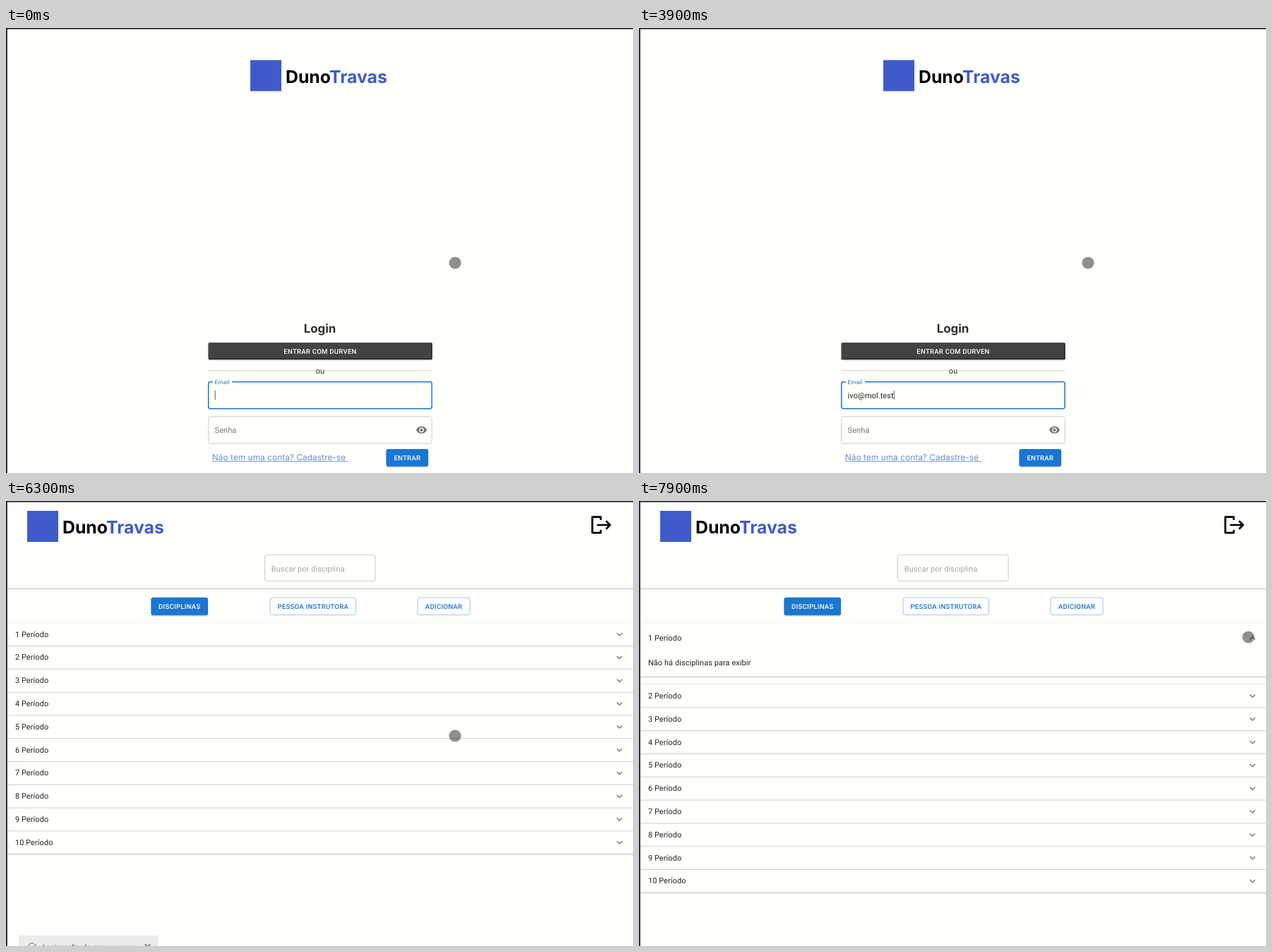
An HTML page that plays this animation: 888x631 px, repeating every 8 s.

```html
<!DOCTYPE html>
<html lang="pt">
<head>
<meta charset="utf-8">
<style>
  html, body { margin: 0; width: 100%; height: 100%; overflow: hidden; background: #fffffc; }
  svg { display: block; text-rendering: geometricPrecision; font: 10.93px Roboto, sans-serif; letter-spacing: .1px; }
  .btn { font-size: 9.56px; font-weight: 500; letter-spacing: .27px; text-anchor: middle; }
  .geo { font-family: Inter, sans-serif; letter-spacing: 0; }
</style>
</head>
<body>
<svg id="stage" width="888" height="631" viewBox="0 0 888 631"></svg>
<script>
const LOOP = 8000, TICK = 100;
const BG = '#fffffc', BLUE = '#1976d2', BRAND = '#3f5bc9', GREY = '#757573', INK = '#20201f';
const EMAIL = 'ivo@mol.test';
const EMAIL_KEYS = [700, 700, 700, 1600, 2300, 2500, 2600, 2800, 3500, 3600, 3700, 3900];
const SECRET_KEYS = [4700, 4800, 4900];
const CARET_OFF = [[400, 700], [1200, 1600], [2200, 2300], [5400, 5800]];
const POINTER = [[0, 636, 333], [6700, 636, 333], [6800, 680, 306], [6900, 766, 254], [7000, 812, 226],
  [7100, 812, 226], [7200, 852, 199], [7300, 860, 194], [7400, 863, 193], [LOOP, 863, 193]];

const clamp = x => Math.min(1, Math.max(0, x));
const ease = x => (x = clamp(x), x * x * (3 - 2 * x));
const typed = (keys, t) => keys.filter(k => t >= k).length;
const pen = document.createElement('canvas').getContext('2d');
pen.font = '10.93px Roboto, sans-serif';
const textWidth = s => pen.measureText(s).width + s.length * .1;

const text = (x, y, s, fill = INK, attrs = '') => `<text x="${x}" y="${y}" fill="${fill}" ${attrs}>${s}</text>`;
const rect = (x, y, w, h, fill, attrs = '') => `<rect x="${x}" y="${y}" width="${w}" height="${h}" fill="${fill}" ${attrs}/>`;
const line = (d, color, width, attrs = '') => `<path d="${d}" fill="none" stroke="${color}" stroke-width="${width}" ${attrs}/>`;
const rule = (x, y, w, color, h = 1) => rect(x, y, w, h, color);

function logo(x, y) {
  return rect(x, y, 44, 44, BRAND) +
    text(x + 50, y + 32, `Duno<tspan fill="${BRAND}">Travas</tspan>`, '#000', 'class="geo" font-size="24.8" font-weight="700"');
}

function button(x, y, w, h, label, fill, outlined) {
  const box = outlined
    ? rect(x + .5, y + .5, w - 1, h - 1, 'none', 'rx="2.7" stroke="#a5c6ea"')
    : rect(x, y + 1.6, w, h, '#0003', 'rx="3"') + rect(x - .5, y + .5, w + 1, h + .3, '#0002', 'rx="3"') +
      rect(x, y, w, h, fill, 'rx="2.7"');
  return box + text(x + w / 2, y + h / 2 + 3.5, label, outlined ? BLUE : '#fff', 'class="btn"');
}

// Outlined input; `lift` moves the label from inside the box onto its border.
function field(y, label, notch, value, lift, focus, caret) {
  const color = focus ? BLUE : '#cbcbc8', w = focus ? 1.5 : 1;
  const labelY = y + 22.5 - 19.7 * lift;
  return rect(286.7, y, 316.4, 38, 'none', `rx="2.7" stroke="${color}" stroke-width="${w}"`) +
    rect(293, y - 1.5, notch * lift, 3, BG) +
    text(295.6, labelY, label, focus ? BLUE : GREY, `font-size="${10.93 - 2.73 * lift}"`) +
    text(295.6, y + 22.8, value) +
    (caret ? rect(295.7 + textWidth(value), y + 12.3, .9, 13, '#444') : '');
}

function login(t) {
  const onSecret = t >= 4000, lift = ease((t - 3950) / 220);
  const caret = !CARET_OFF.some(([a, b]) => t >= a && t < b);
  return logo(346, 45.5) +
    text(444.5, 432.3, 'Login', '#2d2d2c', 'class="geo" font-size="16.9" font-weight="700" text-anchor="middle"') +
    button(286.5, 446, 317, 24, 'ENTRAR COM DURVEN', '#424242') +
    line('M287 469.3H602.8V446.5', '#222', 1.3) + line('M287.2 469V446.6H602', '#5a5a5a', .9) +
    rule(286.5, 485.3, 152.5, '#cfcfcc') + rule(451.5, 485.3, 152, '#cfcfcc') +
    text(445, 490, 'ou', INK, 'class="geo" font-size="10.4" text-anchor="middle"') +
    field(501.8, 'Email', 27, EMAIL.slice(0, typed(EMAIL_KEYS, t)), 1, !onSecret, caret && !onSecret) +
    field(551, 'Senha', 30, '•'.repeat(typed(SECRET_KEYS, t)), lift, onSecret, caret && onSecret) +
    `<path transform="translate(580.3 561.8) scale(.683)" fill="${GREY}" d="M12 4.5C7 4.5 2.73 7.61 1 12c1.73 4.39 6 7.5 11 7.5s9.27-3.11 11-7.5c-1.73-4.39-6-7.5-11-7.5zM12 17c-2.76 0-5-2.24-5-5s2.24-5 5-5 5 2.24 5 5-2.24 5-5 5zm0-8c-1.66 0-3 1.34-3 3s1.34 3 3 3 3-1.34 3-3-1.34-3-3-3z"/>` +
    text(291.8, 612.7, 'Não tem uma conta? Cadastre-se', '#6b8dcb', 'class="geo" font-size="11.95"') +
    rule(292, 614, 192, '#6b8dcb', .9) +
    button(538.5, 597, 59.5, 24.5, 'ENTRAR', BLUE);
}

function chevron(y, turn = 0) {
  return line('M-3.7-1.9L0 1.8L3.7-1.9', GREY, 1.35, `transform="translate(868.9 ${y}) rotate(${turn})"`);
}

function periods(t) {
  const ROW = 32.8, TOP = 172.5;
  const p = ease((t - 7540) / 300), head = p ** .8, body = 32.8 * p ** 1.2;
  const headH = ROW + 10.9 * head, bottom = TOP + headH + body;
  const next = bottom + 10.9 * head;
  let out = rule(2, TOP - .7, 886, '#f3f3f0');
  out += text(12.9, TOP + headH / 2 + 3.7, '1 Período') + chevron(TOP + headH / 2 + .2, 180 * head);
  if (p > 0) {
    out += `<svg x="0" y="${TOP}" width="888" height="${bottom - TOP}">` +
      text(12.9, headH + 17.2, 'Não há disciplinas para exibir') + '</svg>' +
      rule(2, bottom - .2, 886, '#bdbdba') + rule(2, bottom + .8, 886, '#e9e9e6') +
      rule(2, next - .5, 886, '#e3e3e0');
  } else out += rule(2, next - .3, 886, '#cfcfcc');
  for (let i = 0; i < 9; i++) {
    const y = next + ROW * i;
    out += text(12.9, y + 20.1, `${i + 2} Período`) + chevron(y + 16.6);
    if (i) out += rule(2, y - .3, 886, '#cfcfcc');
  }
  const end = next + ROW * 9;
  return out + rule(2, end - .3, 886, '#bdbdba') + rule(2, end + .7, 886, '#e6e6e3');
}

function toast(t) {
  const enter = clamp((t - 5760) / 250), leave = clamp((t - 7500) / 290);
  if (leave === 1) return '';
  const s = .75 + .25 * enter, w = leave ? 71 : 198;
  const cross = 18 + w - 15.5;
  return `<g opacity="${enter ** 2 * (1 - leave)}" transform="translate(117 632.5) scale(${s} ${s * s}) translate(-117 -632.5)">` +
    rect(18, 616, w, 33, '#ebebe9', 'rx="2"') +
    line('M42 631A5.3 5.3 0 1 1 39.5 627.6M34.5 631.5L37 634L43 628', leave ? '#b98a7c' : '#858583', 1.2) +
    (leave ? '' : text(52, 635.6, 'Login realizado com sucesso', INK, 'font-size="9.8"')) +
    line(`M${cross - 3.8} 628.4l7.6 7.6m0-7.6l-7.6 7.6`, '#444', 1.2) + '</g>';
}

function home(t) {
  return logo(30, 14) +
    line('M842.3 27V22.6H830.4V45.2H842.3V41M837 34H855.5M849.8 28.3L855.5 34L849.8 39.7', '#000', 2.7, 'stroke-linejoin="round"') +
    rect(366.5, 76.3, 156.6, 37.3, 'none', 'rx="2.7" stroke="#cbcbc8"') +
    text(375.8, 99.5, 'Buscar por disciplina', '#a3a3a1') +
    rule(2, 124, 886, '#bcbcb9') +
    button(205.5, 136.7, 80.5, 25, 'DISCIPLINAS', BLUE) +
    button(373.5, 136.5, 122.5, 25.5, 'PESSOA INSTRUTORA', BLUE, true) +
    button(582.5, 136.5, 75, 25.5, 'ADICIONAR', BLUE, true) +
    (t >= 6000 ? periods(t) : '') + toast(t);
}

function pointer(t) {
  const i = POINTER.findIndex(k => k[0] > t), [t0, x0, y0] = POINTER[i - 1], [t1, x1, y1] = POINTER[i];
  const f = (t - t0) / (t1 - t0), pressed = t >= 1300 && t < 1800;
  return `<circle cx="${x0 + (x1 - x0) * f}" cy="${y0 + (y1 - y0) * f}" r="8.6" fill="#000" fill-opacity="${pressed ? .52 : .44}"/>`;
}

const stage = document.getElementById('stage');
let shown = -1;
function frame() {
  const t = Math.floor(performance.now() % LOOP / TICK) * TICK;
  if (t !== shown) {
    shown = t;
    stage.innerHTML = rect(0, 0, 888, 631, BG) + (t < 5800 ? login(t) : home(t)) + pointer(t) +
      rect(0, 0, 888, 1.6, '#1d1c24') + rect(0, 0, 1.8, 631, '#1d1c24');
  }
  requestAnimationFrame(frame);
}
frame();
</script>
</body>
</html>
```
